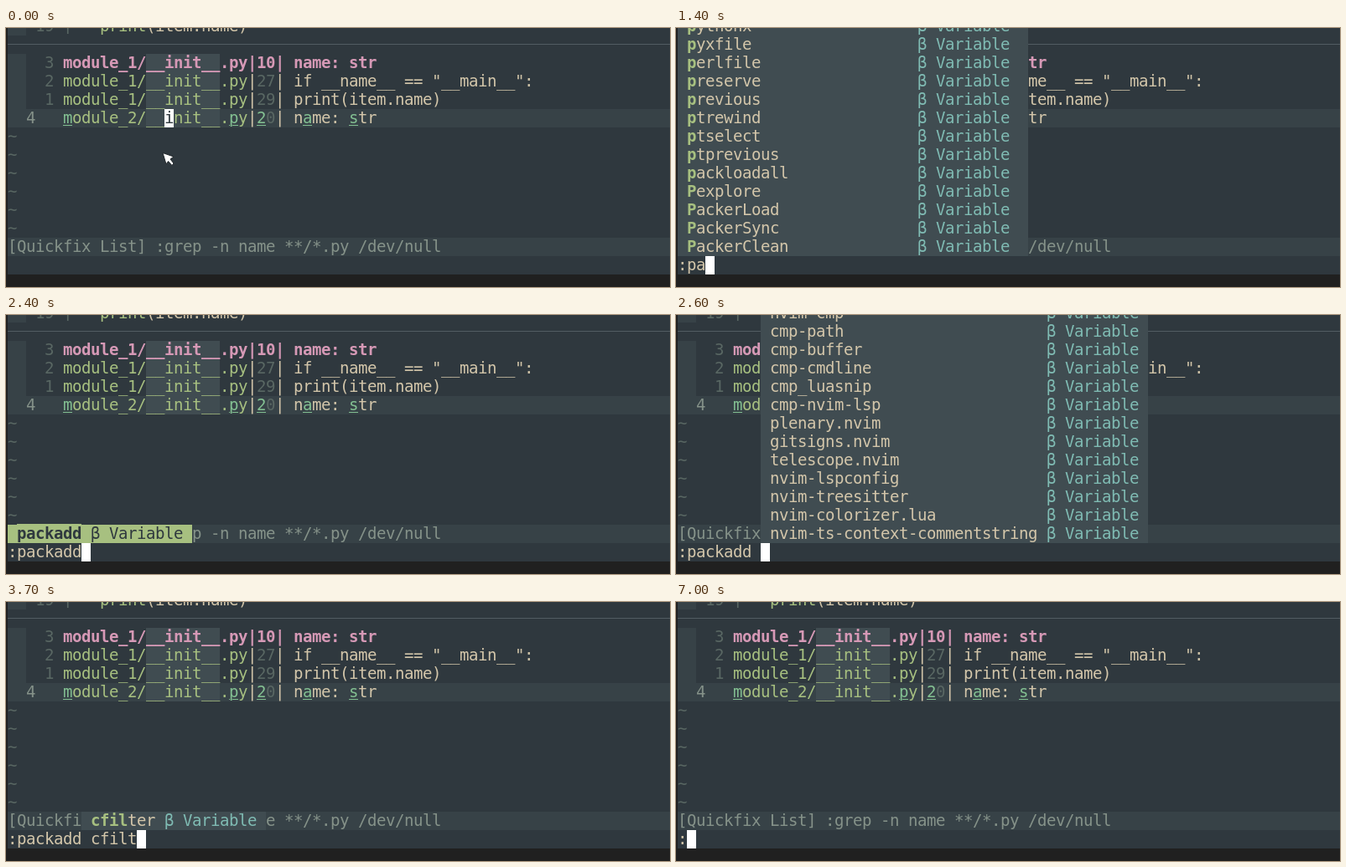
Recreate the animation shown at these times as an HTML page. Size 792x310 px, loop 8000 ms.

```html
<!DOCTYPE html>
<html lang="en">
<head>
<meta charset="utf-8">
<title>Quickfix filter</title>
<style>
  html, body { margin: 0; width: 100%; height: 100%; overflow: hidden; background: #202020; }
  /* 11 x 22 px character cells */
  #grid {
    position: absolute; left: 2px; top: -13px; width: 790px; height: 308px;
    overflow: hidden; background: #2f383e; color: #d3c6aa;
    font: 19px/20px "DejaVu Sans Mono", monospace;
    letter-spacing: calc(11px - 1ch);
    font-kerning: none; font-variant-ligatures: none;
  }
  .cell { position: absolute; height: 22px; white-space: pre; }
  .cell span { display: inline-block; height: 22px; vertical-align: top; }
  b { font-weight: 700; }
  .band { background: #374247; }
  .dim { color: #596763; }
  .grey { color: #859289; }
  .green { color: #a7c080; }
  .pink { color: #d699b6; font-weight: 700; }
  .blue { color: #7fbbb3; }
  .hit { background: #404c51; }
  .scope { color: #83c092; text-decoration: underline 1px; text-underline-offset: 2px; }
  .rule { position: absolute; left: 0; top: 32px; width: 790px; height: 1px; background: #525c62; }
  .menu { background: #404c51; }
  .menu b { color: #a7c080; }
  .picked, .picked b, .picked .blue { background: #a7c080; color: #2f383e; }
  .cursor { background: #fff; color: #2f383e; width: 11px; }
  #mouse { position: absolute; left: 184px; top: 146px; }
</style>
</head>
<body>
<div id="grid"></div>
<svg id="mouse" width="22" height="24">
  <path d="M3 3.5 16 8 12 11 16 16 14 18.5 9.500 13.500 7 17Z" fill="#fff" stroke="#20262a" stroke-width="1"/>
</svg>
<script>
const LOOP = 8000, CW = 11, RH = 22, STATUS = 12, CMD = 13;
const grid = document.getElementById('grid');
const mouse = document.getElementById('mouse');

const span = (cls, text) => `<span class="${cls}">${text}</span>`;
const cell = (col, row, html, cls = '', cols = 0) =>
  `<div class="cell ${cls}" style="left:${col * CW}px;top:${row * RH}px` +
  `${cols ? `;width:${cols * CW}px` : ''}">${html}</div>`;

// Quickfix window
function entry(row, num, dir, line, text) {
  return cell(4, row, num, 'dim') + cell(6, row,
    span('green', dir + '/') + span('green hit', '__init__') + span('green', '.py') +
    '|' + span('dim', line) + '| ' + text);
}

function buildEditor() {
  let html = cell(0, 0, '', 'band', 2) + '<div class="rule"></div>';
  html += cell(3, 0, '19 ¦', 'dim') + cell(10, 0, span('green', 'print') + '(item.name)');
  for (let row = 2; row < 5; row++) html += cell(0, row, '', 'band', 2);
  html += cell(4, 2, '3', 'dim') +
    cell(6, 2, 'module_1/' + span('hit', '__init__') + '.py|10| name: str', 'pink');
  html += entry(3, '2', 'module_1', '27', 'if __name__ == "__main__":');
  html += entry(4, '1', 'module_1', '29', 'print(item.name)');
  html += cell(0, 5, '', 'band', 72) + cell(2, 5, '4', 'grey') + cell(6, 5,
    span('scope', 'm') + span('green', 'odule_2/') + span('green hit', '__init__') +
    span('green', '.') + span('scope', 'p') + span('green', 'y') + '|' +
    span('scope', '2') + span('dim', '0') + '| n' + span('scope', 'a') + 'me: ' +
    span('scope', 's') + 'tr');
  for (let row = 6; row < STATUS; row++) html += cell(0, row, '~', 'dim');
  return html + cell(0, STATUS, '[Quickfix List] :grep -n name **/*.py /dev/null', 'band grey', 72);
}

// Completion menus, listed top to bottom
const words = s => s.split(' ');
const packer = words('packloadall PackerLoad PackerSync PackerClean PackerStatus PackerUpdate ' +
  'PackerCompile PackerInstall PackerProfile PackerSnapshot PackerSnapshotDelete PackerSnapshotRollback');
const info = words('PackageInfoInstall PackageInfoReinstall PackageInfoShowForce PackageInfoChangeVersion');
const lists = {
  p: words('pythonx pyxfile perlfile preserve previous ptrewind ptselect ptprevious packloadall ' +
    'Pexplore PackerLoad PackerSync PackerClean'),
  pack: [info[3], ...packer],
  packa: [...info, ...packer.filter(w => /^pack.*a/i.test(w))],
  packadd: ['packadd'],
  all: words('nvim-cmp cmp-path cmp-buffer cmp-cmdline cmp_luasnip cmp-nvim-lsp plenary.nvim ' +
    'gitsigns.nvim telescope.nvim nvim-lspconfig nvim-treesitter nvim-colorizer.lua ' +
    'nvim-ts-context-commentstring'),
  c: words('cmp-cmdline cmp_luasnip copilot.vim cmp-nvim-lsp cmp-nvim-lua cmp-treesitter ' +
    'close-buffers.nvim cmp-nvim-lsp-signature-help Comment.nvim nvim-cmp nvim-colorizer.lua ' +
    'nvim-ts-context-commentstring FixCursorHold.nvim'),
  cfilter: ['cfilter']
};

// Bold the letters of query in order, ignoring case
function mark(word, query) {
  let i = 0;
  return [...word].map(ch =>
    i < query.length && ch.toLowerCase() === query[i] ? (i++, `<b>${ch}</b>`) : ch).join('');
}

function buildMenu({ list, query = '', col = 0, tail = 1, picked = false }) {
  const items = lists[list];
  const width = list === 'p' ? 24 : Math.max(...items.map(w => w.length));
  return items.map((word, i) => cell(col, STATUS + 1 - items.length + i,
    ' ' + mark(word, query) + ' '.repeat(width - word.length + 1) +
    span('blue', 'β Variable') + ' '.repeat(tail),
    picked ? 'menu picked' : 'menu', width + 12 + tail)).join('');
}

const menu = (list, query, col, extra) => ({ list, query, col, ...extra });
const chosen = { picked: true };

// time, command line, menu; a number in third place is the editor cursor column
const steps = [
  [0, '', 17],
  [200, '', 16],
  [900, ':'],
  [1000, ':'],
  [1300, ':p'],
  [1400, ':pa', menu('p', 'p', 0, { tail: 2 })],
  [1500, ':pac', menu('pack', 'pa')],
  [1600, ':pac', menu('pack', 'pac')],
  [1800, ':pack', menu('pack', 'pack')],
  [2000, ':packa', menu('pack', 'pack')],
  [2100, ':packa', menu('packa', 'packa')],
  [2300, ':packad', menu('packa', 'packa')],
  [2400, ':packadd', menu('packadd', 'packadd', 0, chosen)],
  [2600, ':packadd ', menu('all', '', 9)],
  [3100, ':packadd c', menu('all', '', 9)],
  [3200, ':packadd c'],
  [3400, ':packadd cf', menu('c', 'c', 8)],
  [3500, ':packadd cfi', menu('cfilter', 'cf', 8)],
  [3600, ':packadd cfil', menu('cfilter', 'cfi', 8)],
  [3700, ':packadd cfilt', menu('cfilter', 'cfil', 8)],
  [3800, ':packadd cfilter', menu('cfilter', 'cfilter', 8, chosen)],
  [4400, ':packadd cfilter'],
  [4900, ':packadd cfilter', 16],
  [7000, ':']
];

const editor = buildEditor();
const target = 'module_2/__init__';
let shown = -1;

function draw(now) {
  const t = now % LOOP;
  let i = steps.length - 1;
  while (steps[i][0] > t) i--;
  if (i !== shown) {
    shown = i;
    const [, cmd, extra] = steps[i];
    const inEditor = typeof extra === 'number';
    grid.innerHTML = editor + cell(0, CMD, cmd) +
      (extra && !inEditor ? buildMenu(extra) : '') +
      (inEditor ? cell(extra, 5, target[extra - 6], 'cursor')
                : cell(cmd.length, CMD, '', 'cursor'));
    mouse.style.display = t < 1000 ? '' : 'none';
  }
  requestAnimationFrame(draw);
}
draw(performance.now());
</script>
</body>
</html>
```
